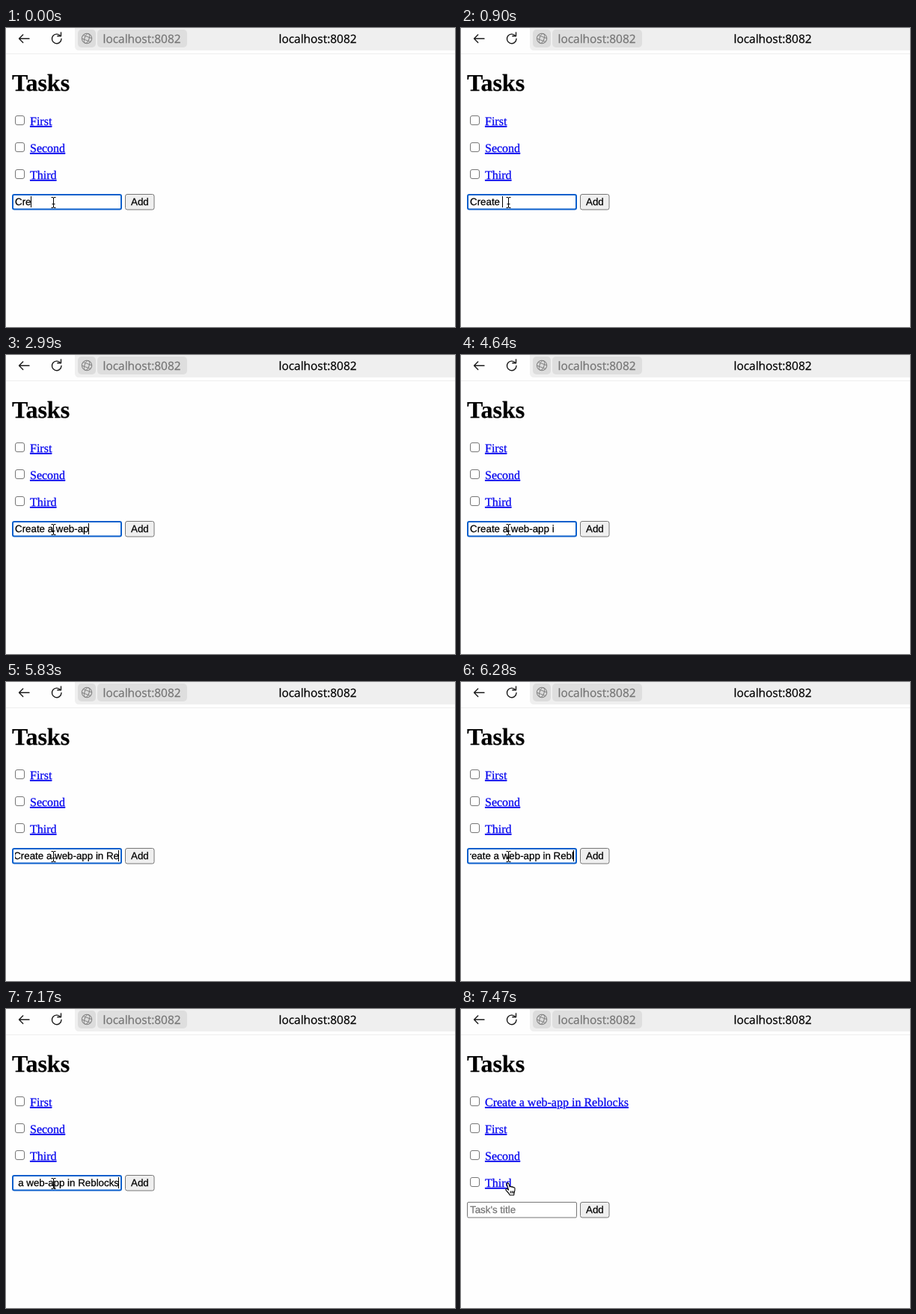
Write an HTML page that moves like this. It is 600 px wide and 400 px high and loops after 8000 ms.

```html
<!DOCTYPE html>
<html lang="en">
<head>
<meta charset="utf-8">
<title>Tasks</title>
<style>
  html, body { margin: 0; width: 100%; height: 100%; overflow: hidden; background: #fefefe; }
  svg { display: block; width: 600px; height: 400px; text-rendering: geometricPrecision; }
  text { white-space: pre; fill: currentColor; stroke: currentColor; stroke-width: .25; }
  .bar { font: 15.45px "Open Sans", "Noto Sans", sans-serif; }
  .head { font: bold 32px "Liberation Serif", Times, serif; }
  .link { font: 16px "Liberation Serif", Times, serif; color: #0000ee; text-decoration: underline; }
  .ui { font: 13.333px "Liberation Sans", Arial, sans-serif; }
  .muted { color: #757575; }
  .box { fill: #fff; stroke: #767676; }
  .focus { stroke: #0a5fcc; stroke-width: 2; }
  .line { fill: none; stroke: #1c1c1c; stroke-width: 1.4; stroke-linecap: round; stroke-linejoin: round; }
  .globe { fill: none; stroke: #808080; stroke-width: 1; }
</style>
</head>
<body>
<svg viewBox="0 0 600 400">
  <clipPath id="inner"><rect x="12" y="224" width="140" height="18"/></clipPath>
  <rect width="600" height="400" fill="#fefefe"/>

  <path d="M92 0H600V30H98Q92 30 92 24Z" fill="#efefef"/>
  <path d="M0 34.5H600" stroke="#efefef"/>
  <rect x="96" y="2" width="24" height="24" rx="5" fill="#dcdcdc"/>
  <rect x="122" y="2" width="120" height="24" rx="5" fill="#dedede"/>
  <path class="line" d="M31 14.3H17.5M22.7 9.1L17.500 14.3L22.7 19.5"/>
  <path class="line" d="M73 11A6.300 6.300 0 1 0 74 14.500M73.500 6V10.700H68.800"/>
  <g class="globe" transform="rotate(20 108 14)">
    <circle cx="108" cy="14" r="6.700"/>
    <ellipse cx="108" cy="14" rx="3" ry="6.700"/>
    <path d="M102 11.500H114M102 16.500H114"/>
  </g>
  <text class="bar muted" x="129.500" y="19.500">localhost:8082</text>
  <text class="bar" x="364.500" y="19.500">localhost:8082</text>

  <text class="head" x="8" y="84.300">Tasks</text>
  <g id="list"></g>

  <g id="form">
    <rect id="blurred" class="box" x="8.500" y="258.500" width="146" height="20.500" rx="1.500"/>
    <rect id="focused" class="box focus" x="9" y="223" width="145" height="19.500" rx="2"/>
    <g id="button">
      <rect x="159.500" y="222.500" width="38.500" height="20.500" rx="2.500" fill="#efefef" stroke="#767676"/>
      <text class="ui" x="167" y="237">Add</text>
    </g>
    <text id="hint" class="ui muted" x="12" y="273">Task's title</text>
    <g clip-path="url(#inner)"><text id="value" class="ui" y="237"></text></g>
    <rect id="caret" y="225" width="1" height="15"/>
  </g>

  <path id="beam" fill="none" stroke="#000"
    d="M60.500 226.500H62Q63.500 226.500 63.500 228Q63.500 226.500 65 226.500H66.500M63.500 228V239M60.500 240.500H62Q63.500 240.500 63.500 239Q63.500 240.500 65 240.500H66.500M61.500 235.500H65.500"/>
  <path id="hand" fill="#fff" stroke="#000" stroke-width="1.100" stroke-linejoin="round"
    d="M61.200 234.400c-.3-1.600 2-2.200 2.600-.6l1.400 4.200c.5-1 2.200-.8 2.400.3c.6-.8 2.100-.5 2.300.6c.8-.5 2 0 2.100 1.200c.2 2.800-.2 4.200-1 6l-.3 2.900h-5.400c-1-2.600-3.400-4.400-5.300-6.600c-.8-1.300.7-2.400 2-1.600l1.600 1.300zM66.200 243.500v3M68.200 243.500v3M70 243.500v3"/>
</svg>
<script>
const LOOP = 8000, SUBMIT = 7470;
const KEY_GAP = 150, IDLE = 445;
const LEFT = 12, RIGHT = 150, ROW = 36;
const TASKS = ["First", "Second", "Third"];

// Bursts of typing: start time, then one key press per KEY_GAP.
const BURSTS = [
  [0, "Cre", "a"], [450, "te"], [900, " ", "a"], [1350, " "], [1650, "w", "e"],
  [2400, "b", "-"], [2840, "a", "p", "p", " "], [4190, "i"], [4940, "n", " "],
  [5540, "R"], [5830, "e"], [6130, "b", "l", "o", "c", "ks"]
];
const KEYS = BURSTS.flatMap(([start, ...keys]) =>
  keys.map((key, i) => ({ time: start + i * KEY_GAP, key })));
const TITLE = KEYS.map(k => k.key).join("");

const $ = id => document.getElementById(id);
const show = (on, ...ids) => ids.forEach(id => { $(id).style.display = on ? "" : "none"; });

function drawList(tasks) {
  $("list").innerHTML = tasks.map((name, i) =>
    `<g transform="translate(0 ${i * ROW})">
      <rect class="box" x="12.5" y="117.5" width="12" height="12" rx="2.5"/>
      <text class="link" x="32" y="130">${name}</text>
    </g>`).join("");
}

function drawTyping(t) {
  const pressed = KEYS.filter(k => k.time <= t);
  const value = $("value");
  value.textContent = pressed.map(k => k.key).join("");
  const end = LEFT + value.getComputedTextLength();
  value.setAttribute("x", LEFT - Math.max(0, end - RIGHT - 1));
  $("caret").setAttribute("x", Math.min(RIGHT, Math.floor(end + 0.25)));
  show(t - pressed.at(-1).time < IDLE, "caret");
}

let submitted = null;
function draw(t) {
  const done = t >= SUBMIT;
  if (done !== submitted) {
    submitted = done;
    drawList(done ? [TITLE, ...TASKS] : TASKS);
    $("button").setAttribute("transform", `translate(0 ${done ? ROW : 0})`);
    show(done, "blurred", "hint", "hand");
    show(!done, "focused", "value", "beam");
    if (done) show(false, "caret");
  }
  if (!done) drawTyping(t);
}

const start = performance.now();
function tick(now) {
  draw(Math.max(0, now - start) % LOOP);
  requestAnimationFrame(tick);
}
draw(0);
requestAnimationFrame(tick);
</script>
</body>
</html>
```
